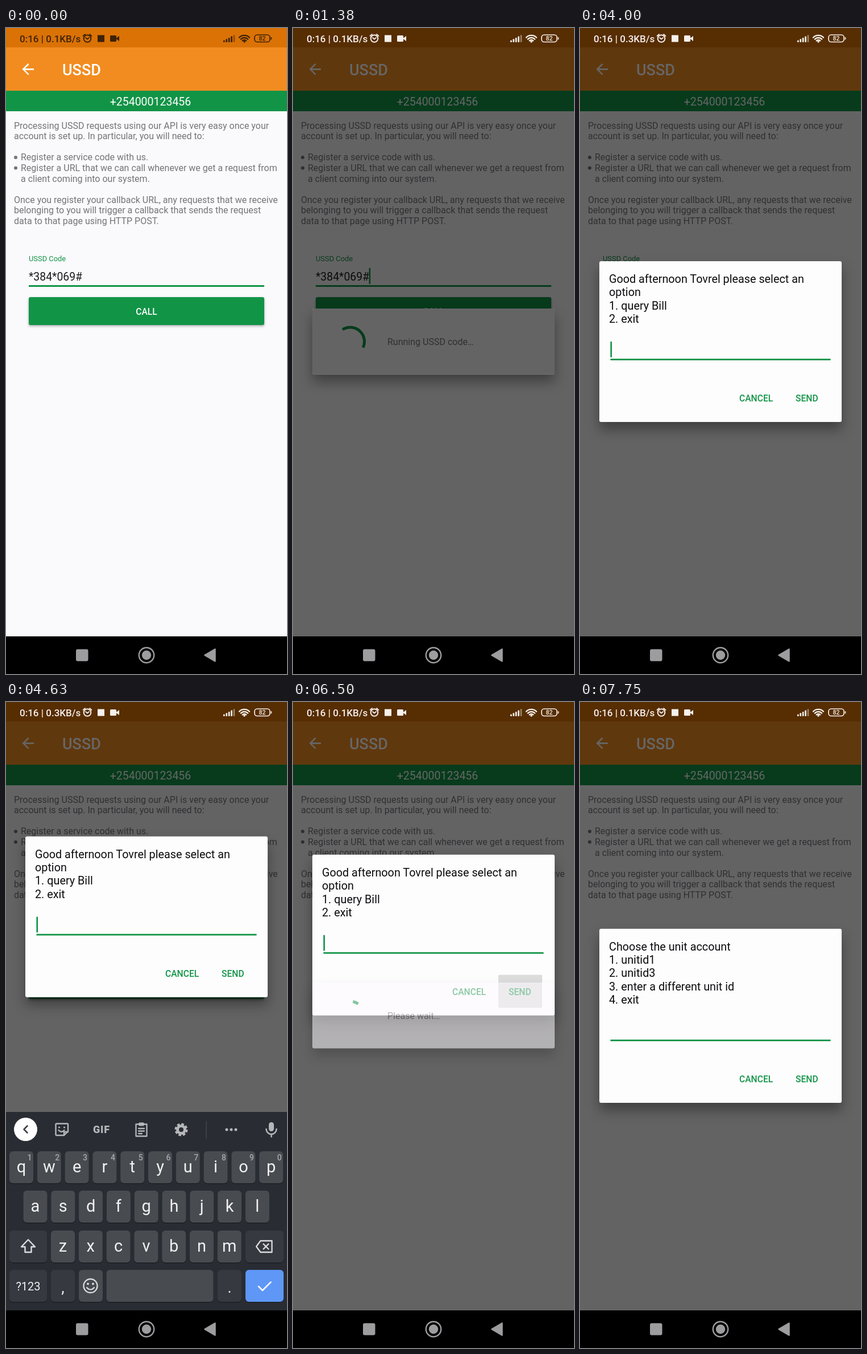
Write an HTML page that moves like this. It is 494x1133 px and loops after 8 s.

```html
<!DOCTYPE html>
<html lang="en">
<head>
<meta charset="utf-8">
<title>USSD session</title>
<style>
html, body { margin: 0; width: 100%; height: 100%; overflow: hidden; background: #000; }
svg { display: block; width: 494px; height: 1133px; font-family: Roboto, sans-serif; }
text { white-space: pre; }
.medium { font-weight: 500; }
.mid { text-anchor: middle; }
.line { fill: none; stroke-linecap: round; stroke-linejoin: round; }
.card { filter: drop-shadow(0 13px 11px rgba(0, 0, 0, .36)); }
</style>
</head>
<body>
<svg id="stage" viewBox="0 0 494 1133" xmlns="http://www.w3.org/2000/svg"></svg>
<script>
const LOOP = 8000, TICK = 125;
const GREEN = '#129447', GREY = '#757478', ICON = '#b5b7ba';

const rect = (x, y, w, h, fill, r = 0, extra = '') =>
  `<rect x="${x}" y="${y}" width="${w}" height="${h}" rx="${r}" fill="${fill}" ${extra}/>`;
const text = (x, y, size, fill, str, cls = '', extra = '') =>
  `<text x="${x}" y="${y}" font-size="${size}" fill="${fill}" class="${cls}" ${extra}>${str}</text>`;
const disc = (x, y, r, fill) => `<circle cx="${x}" cy="${y}" r="${r}" fill="${fill}"/>`;
const path = (d, fill, extra = '') => `<path d="${d}" fill="${fill}" ${extra}/>`;
const line = (d, colour, width, extra = '') =>
  `<path class="line" d="${d}" stroke="${colour}" stroke-width="${width}" ${extra}/>`;
const group = (id, body, extra = '') => `<g id="${id}" ${extra}>${body}</g>`;

function appScreen() {
  const paragraphs = [
    [14, 0, 'Processing USSD requests using our API is very easy once your'],
    [14, 1, 'account is set up. In particular, you will need to:'],
    [26, 3, 'Register a service code with us.'],
    [26, 4, 'Register a URL that we can call whenever we get a request from'],
    [26, 5, 'a client coming into our system.'],
    [14, 7, 'Once you register your callback URL, any requests that we receive'],
    [14, 8, 'belonging to you will trigger a callback that sends the request'],
    [14, 9, 'data to that page using HTTP POST.']
  ].map(([x, row, str]) => text(x, 176.7 + row * 18.56, 16, GREY, str)).join('');
  return rect(0, 0, 494, 1067, '#faf9fc') +
    rect(0, 0, 494, 34, '#da7206') + rect(0, 34, 494, 77, '#f28c20') +
    path('M20 11H7.83l5.59-5.59L12 4l-8 8 8 8 1.41-1.41L7.83 13H20z', '#fff',
      'transform="translate(23.4 57) scale(1.28)"') +
    text(99, 83, 27, '#fff', 'USSD', 'medium') +
    rect(0, 110, 494, 36, GREEN) +
    text(254, 136, 19.5, '#fff', '+254000123456', 'mid') +
    paragraphs + disc(17, 227, 3, GREY) + disc(17, 245.5, 3, GREY) +
    text(40, 408.7, 12.9, GREEN, 'USSD Code') +
    text(40, 443, 19.4, '#1c1b1e', '*384*069#') +
    rect(133.6, 421, 2.6, 28, GREEN, 0, 'id="codeCaret"') +
    rect(40, 451, 414, 3, GREEN) +
    rect(40, 472, 414, 49, GREEN, 3, 'style="filter:drop-shadow(0 2px 2px rgba(0,0,0,.3))"') +
    rect(40, 472, 414, 49, '#fff', 3, 'id="callRipple"') +
    text(247, 503, 15.6, '#fff', 'CALL', 'medium mid');
}

function statusBar() {
  const bars = [0, 1, 2, 3, 4].map(i =>
    rect(382 + i * 4.4, 21.5 - i * 2.3, 2.7, 3.5 + i * 2.3, 'currentColor', 1, i > 3 ? 'opacity=".45"' : '')).join('');
  const waves = [4.5, 8.5, 12.5].map(r =>
    line(`M${419 - r * .72} ${25.5 - r * .7}A${r} ${r} 0 0 1 ${419 + r * .72} ${25.5 - r * .7}`, 'currentColor', 2.4)).join('');
  return text(24, 25, 17, 'currentColor', '', 'medium', 'id="clock"') +
    '<circle cx="143" cy="18.5" r="6.3" fill="none" stroke="currentColor" stroke-width="2"/>' +
    line('M140 17l3 2.5 3-2.5M135.5 14l3.5-3M150.5 14l-3.5-3', 'currentColor', 1.7) +
    rect(161, 12.5, 12, 12, 'currentColor') +
    rect(183, 13, 11, 11, 'currentColor', 1.5) + path('M193 18.5l6-4.5v9z', 'currentColor') +
    bars + waves + disc(419, 24, 1.8, 'currentColor') +
    rect(437, 12, 27, 12.5, 'none', 4.5, 'stroke="currentColor" stroke-width="1.7"') +
    rect(465.6, 16, 1.7, 4.5, 'currentColor', 1) +
    text(450.5, 22, 10.5, 'currentColor', '82', 'medium mid');
}

const navBar = () => rect(0, 1067, 494, 66, '#000') +
  rect(123, 1089.5, 21.5, 21, '#9d9c9f', 3) +
  '<circle cx="247" cy="1100" r="13.2" fill="none" stroke="#9d9c9f" stroke-width="2.4"/>' +
  disc(247, 1100, 8.2, '#9d9c9f') +
  path('M349.5 1100L367.5 1089.5V1110.5z', '#9d9c9f', 'stroke="#9d9c9f" stroke-width="2.5" stroke-linejoin="round"');

const loader = (id, label) => group(id,
  rect(34, 492, 426, 115.5, '#fdfbfe', 3, 'class="card"') +
  `<path id="${id}Arc" fill="none" stroke="${GREEN}" stroke-width="5"/>` +
  text(166, 556.3, 16, GREY, label) +
  rect(34, 492, 426, 115.5, '#000', 3, `id="${id}Shade"`));

// Drawn from its own top edge; moved into place by a transform.
function dialog(id, lines) {
  const grow = (lines.length - 4) * 23.4;
  const field = 171 + grow, base = 246.3 + grow;
  return group(id,
    rect(34, 0, 426, 282 + grow, '#fefdfe', 3, 'class="card"') +
    lines.map((str, i) => text(51, 38 + i * 23.4, 19.8, '#0c0b0d', str)).join('') +
    text(54, field - 8, 19.8, '#0c0b0d', '1', '', `id="${id}Typed"`) +
    rect(53.4, field - 30, 2.7, 27.5, GREEN, 0, `id="${id}Caret"`) +
    rect(53.5, field, 387, 2.8, GREEN) +
    rect(361, base - 35.5, 77, 58, '#000', 2, `id="${id}Ripple"`) +
    text(280, base, 15.65, GREEN, 'CANCEL', 'medium') +
    text(379, base, 15.65, GREEN, 'SEND', 'medium'));
}

const KEY = '#484b50', DARK = '#363940';
const key = (x, y, w, fill, label = '', size = 29, dy = 37) =>
  rect(x, y + 1.5, w, 56, '#1d1f24', 6) + rect(x, y, w, 56, fill, 6) +
  (label && text(x + w / 2, y + dy, size, '#f1f1f2', label, 'mid'));
const keyRow = (chars, x, y) => [...chars].map((c, i) =>
  key((x + i * 48.8).toFixed(1) * 1, y, 42, KEY, c.replace('&', '&amp;'))).join('');

function toolbar() {
  const teeth = '<circle cx="308" cy="750" r="9.5" fill="none" stroke="#b5b7ba" stroke-width="4" stroke-dasharray="4.5 2.96"/>';
  return disc(34.5, 749.5, 20.5, '#fff') + line('M37.5 743.5l-6 6 6 6', '#3c3f45', 2.6) +
    line('M88.5 739.5h19a1.5 1.5 0 0 1 1.5 1.5v12l-7 7h-13a1.5 1.5 0 0 1-1.5-1.5v-17.5a1.5 1.5 0 0 1 1.5-1.5zM102 760v-6h7M92.5 751q5 5.5 10 0', ICON, 2.4) +
    disc(93.5, 746, 1.6, ICON) + disc(102.5, 746, 1.6, ICON) +
    text(168, 756, 18, ICON, 'GIF', 'mid', 'font-weight="800" letter-spacing=".8"') +
    line('M228.5 740.5h19v21h-19zM233 748h10M233 752.5h10M233 757h6', ICON, 2.3) +
    rect(233, 737.5, 10, 6, ICON, 2) +
    teeth + '<circle cx="308" cy="750" r="6.5" fill="none" stroke="#b5b7ba" stroke-width="5"/>' +
    rect(351.5, 735, 1.2, 31, '#4b4e54') +
    [388, 396, 404].map(x => disc(x, 750, 2.5, ICON)).join('') +
    rect(462, 737, 9, 16, ICON, 4.5) + line('M457.5 749a9 9 0 0 0 18 0M466.5 758.5v4', ICON, 2.5);
}

function keyboard() {
  const hints = [...'1234567890'].map((d, i) =>
    text(41.5 + i * 48.8, 803.5, 14, '#a6a9ad', d, 'medium mid')).join('');
  const letters = keyRow('qwertyuiop', 6, 788) + hints + keyRow('asdfghjkl', 30.5, 857) +
    keyRow('zxcvbnm', 79, 927) + key(6, 927, 66, DARK) +
    line('M39 943l-12 12.5h6.5v9.5h11v-9.5h6.5z', '#dcdddf', 2.4) +
    key(6, 996, 66, DARK, '?123', 20, 36) + key(128, 996, 42, KEY) +
    '<circle cx="148.5" cy="1024" r="12" fill="none" stroke="#dcdddf" stroke-width="2.3"/>' +
    disc(144, 1020.5, 1.9, '#dcdddf') + disc(153, 1020.5, 1.9, '#dcdddf') +
    line('M142 1027q6.500 7 13 0', '#dcdddf', 2.2);
  const symbols = keyRow('1234567890', 6, 788) + keyRow('@#$_&-+()/', 6, 857) +
    keyRow('*"\':;!?', 79, 927) + key(6, 927, 66, DARK, '=\\&lt;', 20, 35) +
    key(6, 996, 66, DARK, 'ABC', 20, 36) + key(128, 996, 42, DARK) +
    text(149, 1022, 14, '#f1f1f2', '1 2', 'mid') + text(149, 1038, 14, '#f1f1f2', '3 4', 'mid');
  return rect(0, 719, 494, 348, '#292c33') + toolbar() +
    group('letters', letters) + group('symbols', symbols) +
    key(79, 996, 42, DARK, ',', 27, 40) + key(176.5, 996, 188, KEY) +
    key(372, 996, 42, DARK, '.', 27, 40) +
    key(421, 927, 67, DARK) +
    line('M440 955l7.5-10h20v20h-20zM452.500 950.500l9 9M461.500 950.500l-9 9', '#dcdddf', 2.3) +
    key(421, 996, 67, '#5e97f6') + line('M444 1025l7 7 14.500-14.500', '#fff', 2.5) +
    group('popup', rect(2, 724, 50, 120, '#5c5f65', 8) + text(27, 766, 33, '#fff', '1', 'mid'));
}

document.getElementById('stage').innerHTML =
  '<clipPath id="aboveNav"><rect width="494" height="1067"/></clipPath>' +
  group('screen', appScreen() + rect(0, 0, 494, 1067, '#000', 0, 'id="dim"') +
    loader('running', 'Running USSD code…') +
    dialog('menu', ['Good afternoon Tovrel please select an', 'option', '1. query Bill', '2. exit']) +
    group('keys', keyboard()) +
    loader('waiting', 'Please wait…') +
    dialog('units', ['Choose the unit account', '1. unitid1', '2. unitid3', '3. enter a different unit id', '4. exit']),
  'clip-path="url(#aboveNav)"') + navBar() + group('status', statusBar());

const el = {};
document.querySelectorAll('[id]').forEach(node => el[node.id] = node);

const ramp = (t, from, to) => Math.min(1, Math.max(0, (t - from) / (to - from)));
const within = (t, from, to) => t >= from && t < to;
const easeOut = p => 1 - (1 - p) ** 2;
const smooth = p => p * p * (3 - 2 * p);
const fade = (id, value) => {
  el[id].style.opacity = value;
  el[id].style.display = value > 0 ? '' : 'none';
};
const lower = (id, y) => el[id].setAttribute('transform', `translate(0 ${y.toFixed(2)})`);

// Fast-out slow-in curve, solved for the bezier parameter by bisection.
function standardEase(x) {
  let lo = 0, hi = 1, s = .5;
  for (let i = 0; i < 18; i++) {
    s = (lo + hi) / 2;
    const v = 1.2 * (1 - s) ** 2 * s + .6 * (1 - s) * s * s + s ** 3;
    if (v < x) lo = s; else hi = s;
  }
  return 3 * (1 - s) * s * s + s ** 3;
}

function spin(id, age) {
  const half = 667, cycle = Math.max(0, Math.floor(age / (2 * half)));
  const local = age - cycle * 2 * half;
  const tail = 270 * standardEase(ramp(local, half, 2 * half));
  const head = 270 * standardEase(ramp(local, 0, half)) + 11;
  const turn = -98 + age * .2246 + cycle * 270;
  const at = deg => {
    const a = (turn + deg) * Math.PI / 180;
    return `${(100.5 + 25 * Math.cos(a)).toFixed(2)} ${(550 + 25 * Math.sin(a)).toFixed(2)}`;
  };
  el[id + 'Arc'].setAttribute('d', `M${at(tail)}A25 25 0 ${head - tail > 180 ? 1 : 0} 1 ${at(head)}`);
}

function render(t) {
  const light = t >= 1000;
  el.status.style.color = light ? '#f6f1ec' : '#3d2206';
  el.clock.textContent = `0:16 | ${within(t, 2000, 5750) ? '0.3' : '0.1'}KB/s`;

  fade('codeCaret', t >= 250 ? 1 : 0);
  fade('callRipple', .16 * ramp(t, 100, 300) * (1 - ramp(t, 400, 620)));
  fade('dim', .6 * ramp(t, 430, 680));

  fade('running', t < 1750 ? ramp(t, 460, 630) : 0);
  fade('runningShade', t >= 1250 ? .6 : 0);
  spin('running', t - 476);

  const rise = smooth(ramp(t, 4130, 4480)), drop = easeOut(ramp(t, 6472, 6760));
  lower('menu', 409 - 173.3 * (rise - drop));
  fade('menu', ramp(t, 1380, 1640) * (1 - ramp(t, 6500, 6720)));
  fade('menuCaret', within(t, 2000, 2500) || within(t, 3000, 3500) || within(t, 5000, 5625) ? 0 : 1);
  const typed = within(t, 5750, 6500);
  fade('menuTyped', typed ? 1 : 0);
  el.menuCaret.setAttribute('x', typed ? 65 : 53.4);
  fade('menuRipple', .13 * ramp(t, 6150, 6400));

  fade('keys', within(t, 4000, 6500) ? 1 : 0);
  lower('keys', 348 * (1 - easeOut(ramp(t, 4050, 4400))));
  fade('letters', t < 5125 ? 1 : 0);
  fade('symbols', t >= 5125 ? 1 : 0);
  fade('popup', within(t, 5625, 5875) ? 1 : 0);

  fade('waiting', t < 7625 ? ramp(t, 6415, 6580) : 0);
  fade('waitingShade', t >= 7250 ? .6 : 0);
  spin('waiting', t - 6415);

  lower('units', 397.7);
  fade('units', ramp(t, 7250, 7500));
  fade('unitsCaret', t < 7750 ? 1 : 0);
  fade('unitsTyped', 0);
  fade('unitsRipple', 0);
}

const start = performance.now();
function frame() {
  const t = (performance.now() - start) % LOOP;
  render(Math.floor(t / TICK) * TICK);
  requestAnimationFrame(frame);
}
frame();
</script>
</body>
</html>
```
